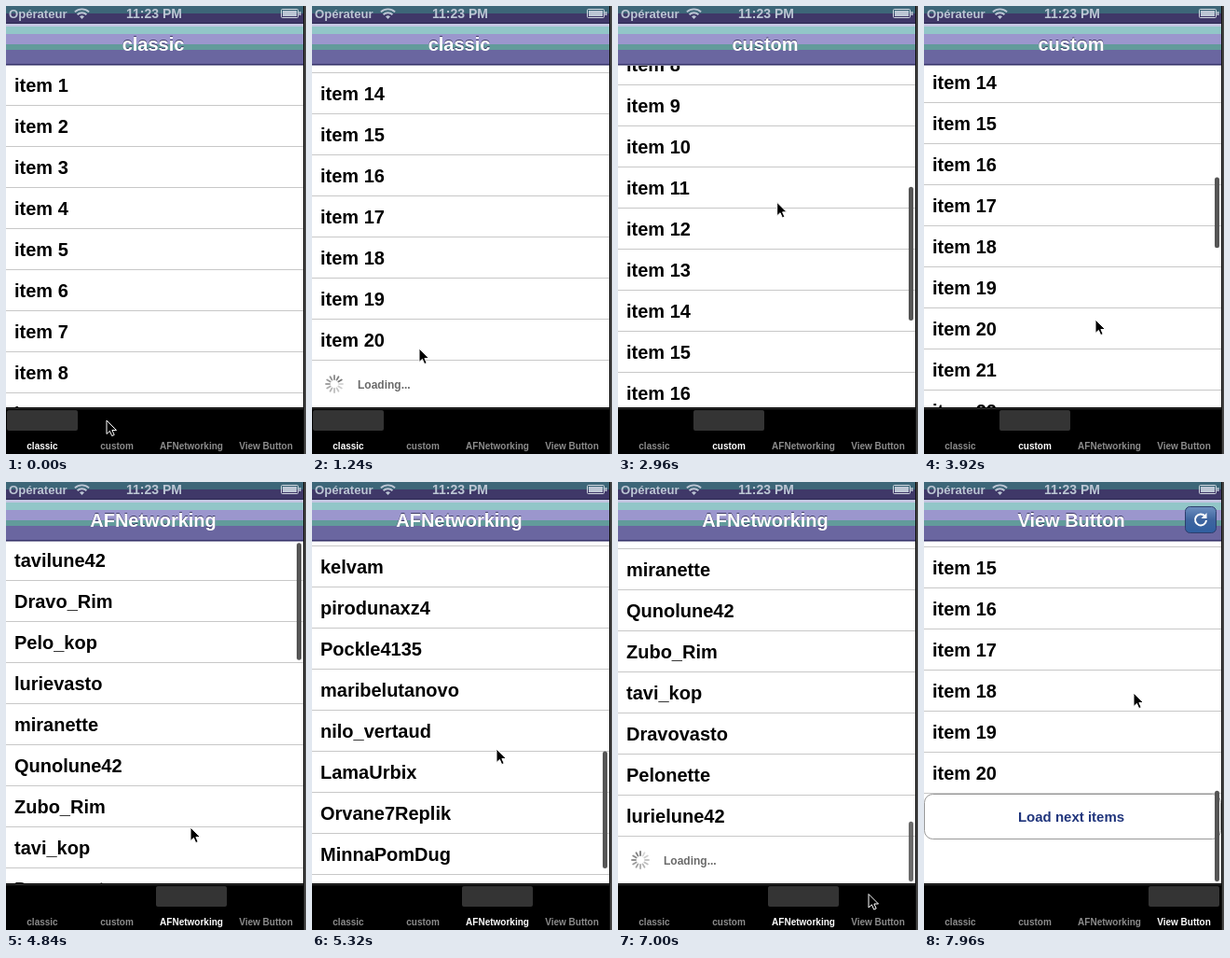
Recreate the animation shown at these times as an HTML page. Size 322 by 480 pixels, loop 8000 ms.

```html
<!DOCTYPE html>
<html lang="fr">
<head>
<meta charset="utf-8">
<title>Paginated lists</title>
<style>
html, body { margin: 0; width: 100%; height: 100%; overflow: hidden; background: #fff; }
svg { display: block; width: 322px; height: 480px; font-family: "Liberation Sans", Arial, sans-serif; font-weight: bold; }
text { white-space: pre; }
.mid { text-anchor: middle; }
</style>
</head>
<body>
<svg id="stage" viewBox="0 0 322 480">
  <defs>
    <clipPath id="view"><rect y="63" width="319" height="367"/></clipPath>
    <linearGradient id="blue" x2="0" y2="1">
      <stop stop-color="#6d8fc0"/><stop offset=".5" stop-color="#3f659f"/><stop offset="1" stop-color="#2f5fa0"/>
    </linearGradient>
  </defs>
  <rect width="322" height="480" fill="#fff"/>
  <g clip-path="url(#view)">
    <g id="rows" font-size="20"></g>
    <g id="loading">
      <g id="spinner" stroke="#777" stroke-width="1.8" stroke-linecap="round"></g>
      <text x="49" y="30" font-size="12" fill="#6a6a6a">Loading...</text>
    </g>
    <g id="more">
      <rect x=".5" y=".5" width="318" height="48" rx="9" fill="#fff" stroke="#999"/>
      <text class="mid" x="158" y="30" font-size="15" fill="#20357c">Load next items</text>
    </g>
    <rect id="bar" x="312" width="5" rx="2.5" fill="#555"/>
  </g>

  <g id="bands"></g>
  <g fill="#bcc6d4">
    <text x="3" y="13" font-size="13.1">Opérateur</text>
    <text class="mid" x="159" y="13" font-size="14">11:23 PM</text>
    <path d="M79 11.3 81.500 14 84 11.300A3.700 3.700 0 0 0 79 11.300Z"/>
    <path d="M76.600 9.200A7 7 0 0 1 86.400 9.200M73.900 6.400A11 11 0 0 1 89.100 6.400" fill="none" stroke="#bcc6d4" stroke-width="1.900"/>
    <rect x="295.500" y="3.500" width="18" height="9" rx="1" fill="none" stroke="#d5dce4"/>
    <rect x="297" y="5" width="15" height="6"/>
    <rect x="314.500" y="6" width="2" height="4"/>
  </g>
  <g class="mid" font-size="20">
    <text id="shade" y="47" fill="#3d3a66"></text>
    <text id="title" y="48" fill="#fff"></text>
  </g>
  <g id="reload">
    <rect x="280.500" y="26.500" width="33" height="28" rx="5" fill="url(#blue)" stroke="#2d3d6c"/>
    <path d="M301.500 36.500A6 6 0 1 0 303 41" fill="none" stroke="#fff" stroke-width="2"/>
    <path d="M303.500 33V39H297.500Z" fill="#fff"/>
  </g>

  <rect y="430" width="319" height="50" fill="#000"/>
  <rect y="431" width="319" height="1" fill="#333"/>
  <rect id="chosen" y="433" width="76" height="22" rx="2" fill="#343434"/>
  <g id="tabs" class="mid" font-size="10"></g>
  <rect x="319" width="1" height="480" fill="#111"/>
  <rect x="320" width="2" height="480" fill="#444"/>
  <path id="cursor" d="M0 0V14.500L3.400 11.400 5.700 16.600 8.200 15.500 5.900 10.500H10.500Z" fill="#000" stroke="#fff"/>
</svg>
<script>
const LOOP = 8000, TOP = 63, VIEW = 367, ROW = 44, FOOT = 50;
const $ = id => document.getElementById(id);

function add(parent, tag, attrs, text = '') {
  const el = document.createElementNS('http://www.w3.org/2000/svg', tag);
  for (const k in attrs) el.setAttribute(k, attrs[k]);
  el.textContent = text;
  return parent.appendChild(el);
}
const set = (el, k, v) => el.setAttribute(k, v);
const show = (el, on) => set(el, 'display', on ? 'inline' : 'none');

// Scroll keys: [time, offset, ease-out power]
const tabs = [
  { name: 'classic', from: 0, page: 20, load: 1440,
    keys: [[280, 0], [500, 170], [960, 563, 2.5], [1480, 563], [1680, 730], [2100, 1393, 2.5]] },
  { name: 'custom', from: 2360, page: 20, load: 3800,
    keys: [[2660, 0], [2880, 185], [3340, 563, 2.5], [3880, 563], [3920, 574], [4080, 740], [4440, 1393, 2.5]] },
  { name: 'AFNetworking', from: 4560, page: 23, load: 5840, endless: true,
    keys: [[4840, 0], [5060, 180], [5460, 695, 2.39], [5900, 695], [6080, 860], [6300, 1141, 1.6], [6440, 1299], [6860, 1707, 2.5]] },
  { name: 'View Button', from: 7100, page: 20, load: Infinity, button: true,
    keys: [[7300, 0], [7480, 180], [7680, 500, 1.8], [7960, 609]] }
];

// Pointer keys: [time, x, y]
const path = [
  [0, 108, 444], [280, 110, 385], [500, 113, 215], [800, 113, 265], [1240, 115, 367], [1480, 116, 370],
  [1680, 120, 203], [1900, 124, 290], [2200, 130, 465], [2400, 126, 456], [2660, 165, 380], [2880, 170, 195],
  [3250, 176, 320], [3700, 183, 347], [3880, 184, 347], [3920, 184, 336], [4080, 186, 170], [4300, 190, 300],
  [4500, 199, 450], [4600, 199, 450], [4840, 198, 370], [5060, 198, 190], [5320, 198, 286], [5700, 205, 370],
  [5900, 208, 372], [6080, 210, 207], [6300, 213, 370], [6440, 215, 212], [6560, 216, 215], [6800, 230, 330],
  [7040, 272, 450], [7140, 272, 450], [7300, 240, 380], [7480, 230, 200], [7680, 227, 335], [7960, 225, 226]
];

const people = {
  16: 'kelvam pirodunaxz4 Pockle4135 maribelutanovo nilo_vertaud LamaUrbix Orvane7Replik MinnaPomDug'.split(' '),
  30: 'TessaCondru Ulra_J dorlevak _Bravone_ vodlex52 Lili_Mandorbec NILA_FDR Tamboulette Violine_Fandoro'.split(' ')
};
const heads = ['Zubo', 'mira', 'Pelo', 'tavi', 'Quno', 'lurie', 'Dravo'];
const tails = ['nette', '_kop', 'lune42', 'vasto', '_Rim'];

function person(n) {
  for (const first in people) {
    const found = people[first][n - first];
    if (found) return found;
  }
  return heads[n * 3 % 7] + tails[n * 2 % 5];
}

function scrollAt(keys, t) {
  if (t <= keys[0][0]) return 0;
  const i = keys.findIndex(k => k[0] >= t);
  if (i < 0) return keys.at(-1)[1];
  const [t0, a] = keys[i - 1], [t1, b, power = 1] = keys[i];
  return a + (b - a) * (1 - (1 - (t - t0) / (t1 - t0)) ** power);
}

// The indicator stays briefly after a scroll, then fades
function barOpacity(keys, t) {
  let last = -1e4;
  for (let i = 1; i < keys.length; i++) {
    if (keys[i][1] !== keys[i - 1][1] && t >= keys[i - 1][0]) last = Math.min(t, keys[i][0]);
  }
  return Math.max(0, Math.min(1, (280 - (t - last)) / 160));
}

function pointerAt(t) {
  const i = path.findIndex(k => k[0] > t);
  if (i < 0) return path.at(-1).slice(1);
  const [t0, x0, y0] = path[i - 1], [t1, x1, y1] = path[i];
  const u = (t - t0) / (t1 - t0), e = u * u * (3 - 2 * u);
  return [x0 + (x1 - x0) * e, y0 + (y1 - y0) * e];
}

const bands = [
  [0, '#3d6678'], [8, '#3f3868'], [18, '#29264f'], [19, '#c5c6e2'], [22, '#92c6c8'], [30, '#9b96cd'],
  [41, '#629b9b'], [47, '#6a66a0'], [62, '#37356c'], [63, '#8a88a8'], [64]
];
bands.slice(0, -1).forEach(([y, fill], i) =>
  add($('bands'), 'rect', { y, width: 319, height: bands[i + 1][0] - y, fill }));

const rows = Array.from({ length: 10 }, () => {
  const g = add($('rows'), 'g', {});
  add(g, 'rect', { y: 43, width: 319, height: 1, fill: '#c8c8c8' });
  return { g, text: add(g, 'text', { x: 9, y: 29 }) };
});
const spokes = Array.from({ length: 12 }, (_, i) =>
  add($('spinner'), 'path', { d: 'M0-5V-9', transform: `translate(24 25) rotate(${i * 30})` }));
const labels = tabs.map((tab, i) =>
  add($('tabs'), 'text', { x: 39 + i * 80, y: 475 }, tab.name));

function draw(t) {
  const index = tabs.findLastIndex(tab => t >= tab.from);
  const tab = tabs[index];
  const loaded = t >= tab.load;
  const count = tab.page * (loaded ? 2 : 1);
  const hasFoot = !loaded || tab.endless;
  const height = count * ROW + (hasFoot ? FOOT : 0);
  const s = Math.round(scrollAt(tab.keys, t));

  const first = Math.floor(s / ROW);
  rows.forEach(({ g, text }, i) => {
    const n = first + i + 1;
    show(g, n <= count);
    set(g, 'transform', `translate(0 ${TOP + (n - 1) * ROW - s})`);
    text.textContent = tab.endless ? person(n) : 'item ' + n;
  });

  const footAt = `translate(0 ${TOP + count * ROW - s})`;
  set($('loading'), 'transform', footAt);
  set($('more'), 'transform', footAt);
  show($('loading'), hasFoot && !tab.button);
  show($('more'), tab.button);
  const step = Math.floor(t / 83);
  spokes.forEach((el, i) => set(el, 'opacity', 1 - ((step - i) % 12 + 12) % 12 * 0.065));

  const track = VIEW - 4;
  const over = Math.max(0, s - (height - VIEW));
  const size = track * VIEW / height - over;
  set($('bar'), 'height', size);
  set($('bar'), 'y', over ? TOP + 2 + track - size : TOP + 2 + s * track / height);
  set($('bar'), 'opacity', barOpacity(tab.keys, t));

  for (const id of ['shade', 'title']) {
    $(id).textContent = tab.name;
    set($(id), 'x', 158);
  }
  show($('reload'), tab.button);
  set($('chosen'), 'x', 1 + index * 80);
  labels.forEach((el, i) => set(el, 'fill', i === index ? '#fff' : '#8c8c8c'));
  const [x, y] = pointerAt(t);
  set($('cursor'), 'transform', `translate(${x.toFixed(1)} ${y.toFixed(1)})`);
}

const start = performance.now();
function tick() {
  draw((performance.now() - start) % LOOP);
  requestAnimationFrame(tick);
}
tick();
</script>
</body>
</html>
```
